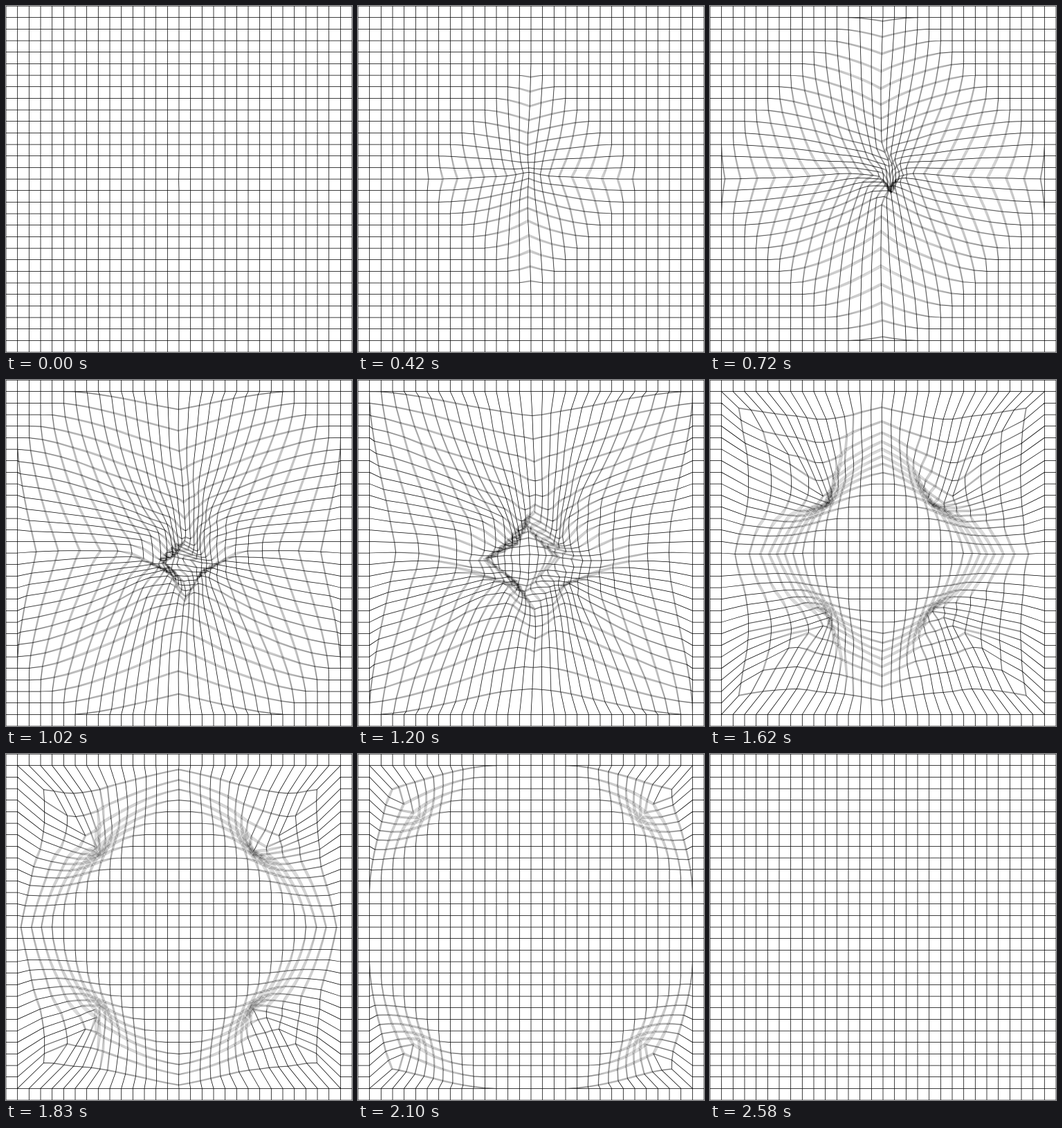
An HTML page with a canvas for the animation above (2.7 s loop, 500 by 500 pixels).

```html
<!DOCTYPE html>
<html lang="en">
<head>
<meta charset="utf-8">
<title>Grid pulse</title>
<style>
  html, body { margin: 0; width: 100%; height: 100%; overflow: hidden; background: #fff; }
  canvas { display: block; width: 500px; height: 500px; }
</style>
</head>
<body>
<canvas id="stage" width="500" height="500"></canvas>
<script>
const ctx = document.getElementById('stage').getContext('2d');

const LOOP = 2700, STEP = 30, LAST = 2580;
const CELLS = 30, MID = CELLS / 2, CELL = 500 / CELLS;
const LIFE = 1350;              // time one vertex is in motion
const DELAY = LIFE / CELLS;     // extra wait per cell of taxicab distance
const SAMPLES = 5;              // motion blur
const EDGES = [0, 1, CELLS - 1, CELLS];

// Sideways drift of a vertex over its life: [progress, x, y]
const DRIFT = [
  [0, 0, 0], [0.06, -2, 0], [0.2, -7, -5], [0.34, -4, -13], [0.44, 12, -7],
  [0.55, 16, 26], [0.63, 11, 21], [0.71, -15, 11], [0.82, -5, 5], [1, 0, 0]
];

const clamp = v => Math.max(0, Math.min(1, v));

function drift(p) {
  let k = 1;
  while (k < DRIFT.length - 1 && p > DRIFT[k][0]) k++;
  const a = DRIFT[k - 1], b = DRIFT[k];
  const f = (1 - Math.cos(Math.PI * (p - a[0]) / (b[0] - a[0]))) / 2;
  return [a[1] + (b[1] - a[1]) * f, a[2] + (b[2] - a[2]) * f];
}

const fixed = (i, j) => [i * CELL, j * CELL];

// Pull towards the middle and back, delayed by taxicab distance
function moved(i, j, t) {
  const [x, y] = fixed(i, j);
  const u = Math.abs(i - MID), v = Math.abs(j - MID);
  const p = clamp((t - (u + v) * DELAY) / LIFE);
  if (p === 0 || p === 1) return [x, y];
  const reach = 0.75 - 0.68 * (Math.max(u, v) / MID) ** 2;
  const pull = reach * Math.sin(Math.PI * p) ** 1.5;
  const [dx, dy] = drift(p);
  return [
    x - (i - MID) * CELL * pull + dx * reach,
    y - (j - MID) * CELL * pull + dy * reach
  ];
}

function trace(points) {
  points.forEach(([x, y], k) => k ? ctx.lineTo(x, y) : ctx.moveTo(x, y));
}

function drawGrid(t) {
  const grid = [];
  for (let i = 1; i < CELLS; i++) {
    grid[i] = [];
    for (let j = 1; j < CELLS; j++) grid[i][j] = moved(i, j, t);
  }
  ctx.beginPath();
  for (const e of EDGES) {
    trace([fixed(e, 0), fixed(e, CELLS)]);
    trace([fixed(0, e), fixed(CELLS, e)]);
  }
  for (let k = 1; k < CELLS; k++) {
    const column = grid[k].slice(1);
    const row = grid.slice(1).map(c => c[k]);
    trace([fixed(k, 0), fixed(k, 1), ...column, fixed(k, CELLS - 1), fixed(k, CELLS)]);
    trace([fixed(0, k), fixed(1, k), ...row, fixed(CELLS - 1, k), fixed(CELLS, k)]);
  }
  ctx.stroke();
}

function draw(t) {
  ctx.globalCompositeOperation = 'source-over';
  ctx.fillStyle = '#fff';
  ctx.fillRect(0, 0, 500, 500);
  // Difference on white subtracts, so the samples add up to one dark line
  ctx.globalCompositeOperation = 'difference';
  ctx.strokeStyle = 'rgb(51,51,51)';
  ctx.lineWidth = 0.75;
  ctx.lineJoin = 'bevel';
  for (let s = 0; s < SAMPLES; s++) {
    drawGrid(t + STEP + (s - (SAMPLES - 1) / 2) * STEP / SAMPLES);
  }
}

let shown = -1;
function tick() {
  const now = performance.now() % LOOP;
  const t = Math.min(LAST, Math.floor(now / STEP) * STEP);
  if (t !== shown) draw(shown = t);
  requestAnimationFrame(tick);
}
tick();
</script>
</body>
</html>
```
